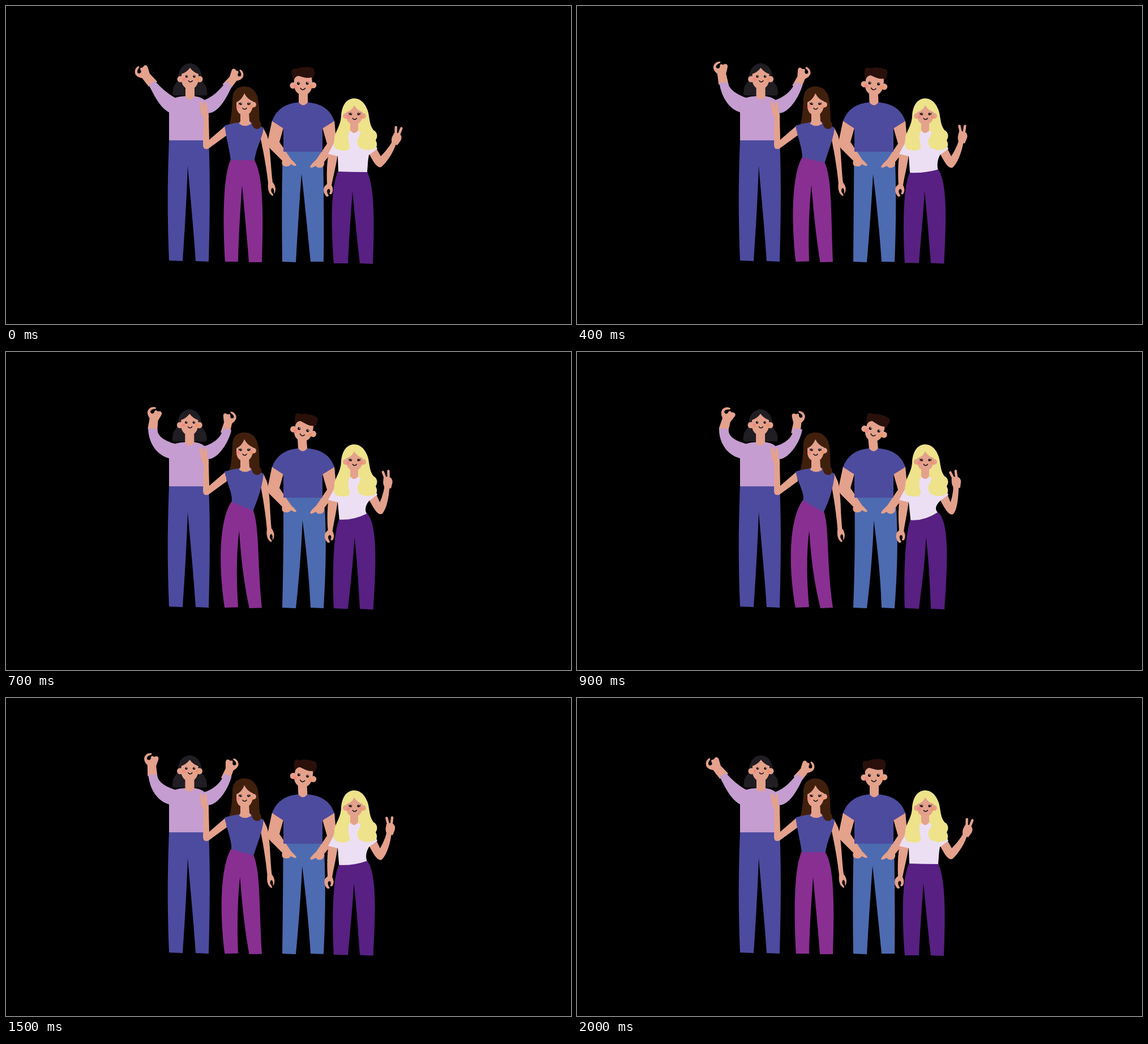
Recreate the animation shown at these times as an HTML page. Size 998x561 px, loop 2.1 s.

```html
<!DOCTYPE html>
<html lang="en">
<head>
<meta charset="utf-8">
<title>Four friends</title>
<style>
  html, body { margin: 0; width: 100%; height: 100%; overflow: hidden; background: #000; }
  svg { display: block; width: 100%; height: 100%; }
  .skin { fill: #e4a18c; }
  .lilac { fill: #c59dd0; }
  .indigo { fill: #4d4b9d; }
  .navy { fill: #4c4b9f; }
  .magenta { fill: #892f92; }
  .denim { fill: #4d6bb0; }
  .violet { fill: #572082; }
  .white { fill: #ecdff3; }
  .black-hair { fill: #201d23; }
  .brown-hair { fill: #40200c; }
  .dark-hair { fill: #2a100a; }
  .blonde { fill: #eee28b; }
  .line { fill: none; stroke: #1c1010; stroke-width: 1.4; stroke-linecap: round; }
  .lash { fill: none; stroke: #1c1010; stroke-width: 1; stroke-linecap: round; }
  .finger { fill: none; stroke: #e4a18c; stroke-width: 4.4; stroke-linecap: round; }
</style>
</head>
<body>
<svg viewBox="0 0 998 561">
  <defs>
    <g id="face">
      <circle cx="-11.5" cy="5" r="3" fill="#f08a80"/>
      <circle cx="12" cy="5" r="3" fill="#ec9668"/>
      <circle cx="-6.8" r="2.2" fill="#140c0c"/>
      <circle cx="6.8" r="2.2" fill="#140c0c"/>
      <circle cx="-6.2" cy="-.8" r=".7" fill="#fff"/>
      <circle cx="7.4" cy="-.8" r=".7" fill="#fff"/>
      <path class="line" d="M-3.6 7.5Q0 12 3.6 7.5"/>
    </g>
    <path id="lashes" class="lash" d="M-8 -.5L-10.5 -1.5M-8 .5L-10.3 .6M8 -.5L10.5 -1.5M8 .5L10.3 .6"/>
    <path id="curled-hand" class="skin" d="M-8.5 3L-11 -16C-15 -19 -18 -23 -18 -28C-17 -34 -12 -38 -6 -37.5Q-5 -36.5 -6 -35C-11 -33 -14 -30 -13 -27C-11 -24 -7 -25 -6.5 -28C-6.5 -30 -6 -33 -4 -33Q-1 -31 2 -33C6 -34 8 -31 7 -27C6 -22 5 -19 4.5 -16L9 3Z"/>
  </defs>

  <g id="man">
    <path class="denim" d="M489 255L560 255C561 300 562 380 561 451L538 451C533 400 528 350 522 296C518 350 515 400 512 452L488 451C487 380 487 320 489 255Z"
      data-to="M490 256L562 256C567 310 566 380 561 452L538 451C536 400 531 350 524 297C522 350 518 400 512 452L488 451C490 390 491 320 490 256Z"/>
    <path class="skin" d="M470 202L490 215L483 240L504 271Q512 278 513 281Q512 284 503 279Q500 285 490 282Q486 279 488 273L466 251Q461 245 463 235ZM580 202L559 215L567 243L548 271Q538 280 537 284Q539 287 547 282Q552 288 559 284Q563 281 562 275L580 253Q584 245 583 235Z"/>
    <path class="indigo" d="M516 170C494 172 478 182 470 203L490 216L490 257L559 257L559 216L580 203C573 182 556 172 533 170Z"/>
    <path class="skin" d="M517 145L533 145L533 170Q525 180 517 170Z" data-to="M514 145L530 148L532 170Q524 180 516 170Z"/>
    <g id="man-head">
      <circle class="skin" cx="507" cy="140" r="5.5"/>
      <circle class="skin" cx="543" cy="140" r="5.5"/>
      <path class="skin" d="M509 122L541 122L541 140C540 151 534 157 525 157C516 157 509 150 509 139Z"/>
      <path class="dark-hair" d="M509 131C505 124 504 115 506 112Q510 109 514 111C521 107 536 107 543 110Q547 113 545 122L541 131L540 126C532 129 522 124 516 123Q510 125 509 131Z"/>
      <use href="#face" transform="translate(524.5 136.5) scale(1.15)"/>
    </g>
  </g>

  <g id="dark-haired-woman">
    <use id="left-hand" href="#curled-hand"/>
    <use id="right-hand" href="#curled-hand"/>
    <path class="lilac" data-ease="1" d="M299 162C286 155 274 145 263 132L252 139C262 158 272 180 289 188L304 190Z"
      data-to="M299 162C284 158 266 151 268 136L251 134C250 152 259 180 289 188L304 190Z"/>
    <path class="lilac" d="M350 166C366 160 378 148 389 133L399 141C391 160 376 188 358 189L344 190Z"
      data-to="M350 166C366 162 383 150 382 134L398 137C394 160 374 188 358 189L344 190Z"/>
    <path class="lilac" d="M298 162Q307 159 317 159L333 159Q346 161 352 167L358 190L358 238L288 238L288 187Z"/>
    <path class="navy" d="M288 237L358 237C361 300 360 380 358 451L335 450C331 390 326 340 321 282C319 340 316 390 312 450L288 449C285 380 285 310 288 237Z"/>
    <g id="dark-haired-head">
      <path class="black-hair" d="M325 101C313 102 305 111 304 126C304 137 295 137 295 150Q293 156 297 158L353 158Q357 156 355 149C355 138 346 138 346 126C345 111 337 102 325 101Z"/>
      <path class="skin" d="M317 140L333 140L333 160Q325 170 317 160Z"/>
      <circle class="skin" cx="308" cy="129" r="5.5"/>
      <circle class="skin" cx="342" cy="129" r="5.5"/>
      <path class="skin" d="M325 109Q331 117 340 120L340 130C339 140 333 147 325 147C317 147 310 140 310 130L310 120Q319 117 325 109Z"/>
      <use href="#face" transform="translate(325.8 124.3)"/>
    </g>
  </g>

  <g id="brown-haired-woman">
    <path class="skin" id="hanging-arm" d="M447 222C454 252 460 285 463 312C462 324 464 331 471 335Q473 334 471 331C467 327 468 321 471 321C473 322 474 326 473 331Q476 330 476 322Q475 315 471 311C467 280 467 245 461 228L454 214Z"/>
    <path class="skin" d="M388 211L359 236L358 197Q359 192 356 188L355 171Q353 168 351 170L350 179L346 169Q343 167 342 170L345 190Q347 194 349 198L348 245Q348 254 357 252L390 228Z"/>
    <path class="magenta" d="M397 271L438 271C454 295 455 360 452 452L429 452C425 400 421 360 417 316C414 360 411 400 410 451L387 451C383 380 383 300 397 271Z"
      data-to="M399 262L436 279C447 310 442 370 452 451L430 452C417 395 414 355 411 315C406 355 406 400 410 450L386 451C374 380 375 295 399 262Z"/>
    <path class="brown-hair" d="M421 142C407 142 400 151 400 165C399 185 398 198 394 210L444 217C452 216 453 208 448 204C447 190 448 175 444 159C440 148 432 142 421 142Z"/>
    <path class="indigo" d="M386 211Q398 207 413 205L433 205Q446 207 455 216C452 235 442 250 439 272L397 272C394 250 389 232 386 211Z"
      data-to="M386 211Q398 207 413 205L433 205Q446 207 455 216C453 236 446 260 436 281L399 263C401 248 392 236 386 211Z"/>
    <path class="brown-hair" d="M437 185C433 196 432 210 438 215Q444 219 449 215Q453 209 448 203L445 180Z"/>
    <path class="skin" d="M414 185L429 185L430 203Q433 205 433 208Q422 215 412 208Q412 206 414 203Z"/>
    <circle class="skin" cx="437" cy="174" r="5"/>
    <path class="skin" d="M421 154Q426 164 436 168L436 177C434 187 429 193 421 193C413 193 407 186 407 177L407 170Q417 165 421 154Z"/>
    <use href="#face" transform="translate(421.5 172.5)"/>
    <use href="#lashes" transform="translate(421.5 172.5)"/>
  </g>

  <g id="blonde-woman">
    <path class="skin" id="lowered-arm" d="M570 258L586 262C583 282 578 300 575 316Q579 323 576 330Q574 334 571 331C574 326 572 322 569 323C566 325 567 330 570 334Q569 338 565 335Q559 328 562 319L567 314C566 295 567 275 570 258Z"/>
    <path class="skin" d="M641 260C648 273 655 287 663 284C672 276 684 260 690 240L683 238Q675 252 662 265L654 251Z"
      data-to="M641 260C648 273 656 289 664 286C671 280 675 260 676 235L667 233Q666 250 660 265L654 251Z"/>
    <g id="peace-hand">
      <path class="finger" d="M-2.5 -4L-5 -17.5M2.5 -4L4.8 -17.5"/>
      <path class="skin" d="M-6 -7Q0 -10 6 -6Q10 -2 8 4L4 13L-5 13Q-9 7 -8 1Z"/>
    </g>
    <path class="violet" d="M587 291L638 292C651 320 651 380 648 455L625 454C620 410 616 370 612 327C609 370 606 410 604 454L579 454C575 400 572 320 587 291Z"
      data-to="M589 295L637 283C658 300 654 380 649 454L625 453C623 410 621 370 616 327C614 370 609 410 604 453L579 452C577 400 578 320 589 295Z"/>
    <path class="white" d="M584 233L569 261L586 265L587 292Q612 293 638 293C639 282 639 272 641 263L656 252L645 228L625 219L605 219Z"
      data-to="M584 233L569 261L586 265L589 296Q612 298 637 284C632 277 635 270 641 263L656 252L645 228L625 219L605 219Z"/>
    <path class="blonde" d="M614 163C600 164 593 177 592 194C591 214 579 224 580 236C577 246 580 254 590 254Q600 257 606 252C610 246 601 237 606 223L626 222C618 236 620 247 626 251Q636 256 646 253C656 252 657 244 653 237C658 229 655 222 649 219C640 207 643 191 637 180C632 169 625 163 614 163Z"/>
    <path class="white" d="M606 222Q611 219 616 224Q622 219 627 222L623 233L607 234Z"/>
    <path class="skin" d="M608 203L622 203L622 219Q615 229 608 219Z"/>
    <circle class="skin" cx="600" cy="194" r="5"/>
    <circle class="skin" cx="631" cy="194" r="5"/>
    <path class="skin" d="M615 175Q620 184 630 187L630 195C628 204 623 209 615 209C607 209 601 203 601 194L601 187Q611 185 615 175Z"/>
    <use href="#face" transform="translate(615.8 190.5)"/>
    <use href="#lashes" transform="translate(615.8 190.5)"/>
  </g>
</svg>
<script>
  const LOOP = 2100, STEP = 100, HALF = 1000;
  const MORPH_REACH = 0.8; // sway at which the data-to outline is met

  const NUMBER = /-?\d*\.?\d+/g;
  const numbers = text => text.match(NUMBER).map(Number);
  const byId = id => document.getElementById(id);

  const morphs = [...document.querySelectorAll("[data-to]")].map(el => ({
    el,
    shape: el.getAttribute("d"),
    from: numbers(el.getAttribute("d")),
    to: numbers(el.dataset.to),
    eased: "ease" in el.dataset
  }));

  function morph({ el, shape, from, to, eased }, sway) {
    const k = eased ? sway * (2 - sway) : sway / MORPH_REACH;
    let i = 0;
    el.setAttribute("d", shape.replace(NUMBER, () => {
      const value = from[i] + (to[i] - from[i]) * k;
      i++;
      return value.toFixed(2);
    }));
  }

  const place = (id, transform) => byId(id).setAttribute("transform", transform);

  function draw(time) {
    const t = Math.floor((time % LOOP) / STEP) * STEP;
    const p = Math.max(0, 1 - Math.abs(t - HALF) / HALF);

    morphs.forEach(m => morph(m, p));
    place("left-hand", `translate(${258 + 2 * p} 135.5) rotate(${-30 + 85 * p - 25 * p * p})`);
    place("right-hand", `translate(${391 - 5 * p} 140) rotate(${30 - 34 * p}) scale(-.92 .95)`);
    place("dark-haired-head", `translate(${-p} 0)`);
    place("man-head", `translate(${-2.5 * p} 0) rotate(${20 * p - 1} 524 148)`);
    place("hanging-arm", `rotate(${1.9 * p} 455 220)`);
    place("lowered-arm", `rotate(${-2.5 * p} 577 262)`);
    place("peace-hand", `translate(${690 - 23 * p} ${232 - 9 * p + 5 * p * p}) rotate(${12 - 32 * p})`);
  }

  const start = performance.now();
  function tick() {
    draw(performance.now() - start);
    requestAnimationFrame(tick);
  }
  tick();
</script>
</body>
</html>
```
